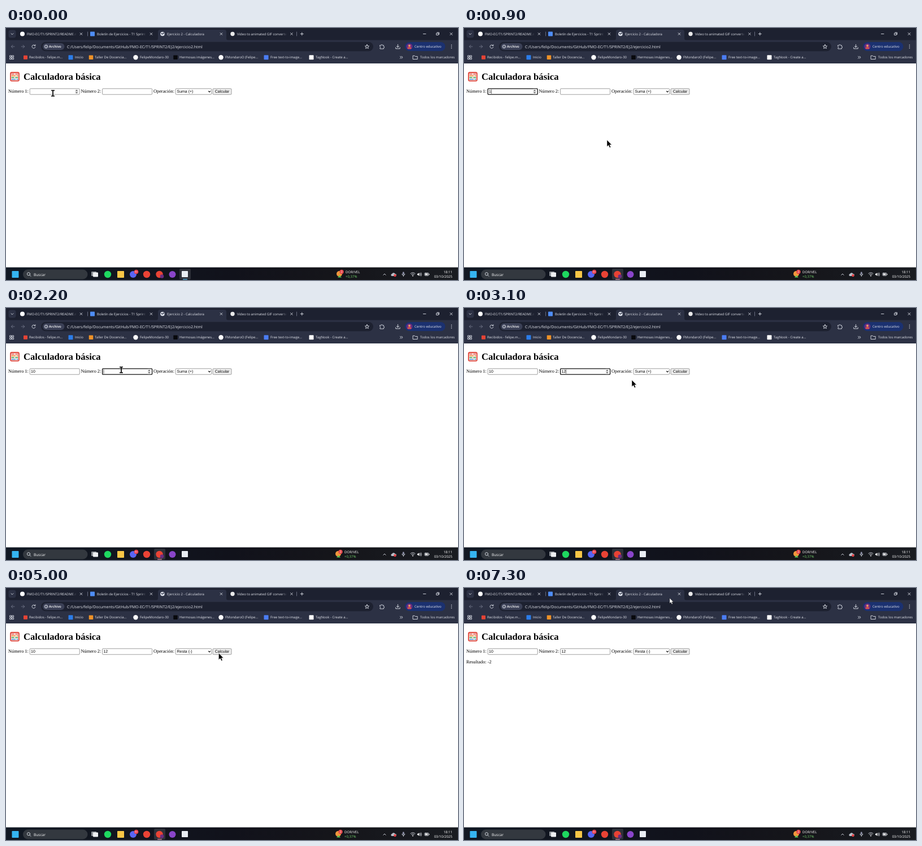
Write an HTML page that moves like this. It is 800x448 px and loops after 7.4 s.

```html
<!DOCTYPE html>
<html lang="es">
<head>
<meta charset="utf-8">
<title>Calculadora básica</title>
<style>
html, body { margin: 0; width: 100%; height: 100%; overflow: hidden; background: #fff; }
svg { display: block; width: 100vw; height: 100vh; }
text { font: 6px "Open Sans", "Noto Sans", sans-serif; fill: #e3e5ec; text-rendering: geometricPrecision; white-space: pre; }
.url { font-size: 6.95px; }
.bar { font-size: 6.1px; fill: #fff; }
.serif { font: 8.33px "Liberation Serif", serif; fill: #000; }
.title { font: bold 16.67px "Liberation Serif", serif; fill: #000; }
.ctl { font: 6.94px "Liberation Sans", sans-serif; fill: #000; }
.line { fill: none; stroke: #dfe2ea; stroke-width: .9; stroke-linecap: round; stroke-linejoin: round; }
.dim { stroke: #72778a; }
.box { fill: #fff; stroke: #767676; stroke-width: .7; }
.focus { stroke: #101010; stroke-width: 1.3; }
.end { text-anchor: end; }
.mid { text-anchor: middle; }
</style>
</head>
<body>
<svg viewBox="0 0 800 448" preserveAspectRatio="none">
  <defs>
    <linearGradient id="fade"><stop stop-color="#1d2130" stop-opacity="0"/><stop offset="1" stop-color="#1d2130"/></linearGradient>
    <linearGradient id="barFill"><stop stop-color="#111823"/><stop offset=".5" stop-color="#11121b"/><stop offset=".72" stop-color="#15151a"/><stop offset="1" stop-color="#191c21"/></linearGradient>
  </defs>
  <rect width="800" height="448" fill="#fff"/>
  <g id="browser"></g>
  <g id="page"></g>
  <g id="taskbar"></g>
  <g id="live"></g>
</svg>
<script>
const $ = id => document.getElementById(id);
const text = (x, y, s, cls = "", extra = "") => `<text x="${x}" y="${y}" class="${cls}" ${extra}>${s}</text>`;
const rect = (x, y, w, h, fill, r = 0) => `<rect x="${x}" y="${y}" width="${w}" height="${h}" rx="${r}" fill="${fill}"/>`;
const dot = (x, y, r, fill) => `<circle cx="${x}" cy="${y}" r="${r}" fill="${fill}"/>`;
const square = (x, y, s, fill) => rect(x - s / 2, y - s / 2, s, s, fill, .8);
const line = (d, cls = "") => `<path class="line ${cls}" d="${d}"/>`;
const ring = (x, y, r) => `<circle class="line" cx="${x}" cy="${y}" r="${r}"/>`;
const cross = (x, y, s) => line(`M${x - s} ${y - s}l${2 * s} ${2 * s}m0 ${-2 * s}l${-2 * s} ${2 * s}`);
const field = (x, y, w, h, cls = "") => `<rect class="box ${cls}" x="${x}" y="${y}" width="${w}" height="${h}" rx="1.2"/>`;

function drawBrowser() {
  const frame = "#1d2130", tool = "#2c3144";
  const tabText = (x, end, s) => text(x, 12.8, s) +
    rect(end - 10, 3, 10, 16, "url(#fade)") + rect(end, 3, 147 - 124, 16, frame);
  const marks = [
    [41, "Recibidos - felipe.m..."], [122, "Inicio"], [157, "Taller De Docencia..."],
    [237, "FelipeMondaro-30"], [307, "Hermosas imágenes..."], [388, "FMondaroO (Felipe..."],
    [468, "Free text-to-image..."], [548, "TagNook - Create a..."], [733, "Todos los marcadores"]
  ];
  let s = rect(0, 0, 800, 23, frame) + rect(0, 21.5, 800, 41.5, tool);

  // Tabs
  s += tabText(37, 125, "FMO-EC/T1/SPRINT2/README.md at") + tabText(161, 248, "Boletín de Ejercicios - T1 Sprint 2") +
    tabText(409, 497, "Video to animated GIF converter");
  s += `<path fill="${tool}" d="M265 22q4 0 4-4V7q0-4 4-4H386q4 0 4 4v11q0 4 4 4z"/>` + text(285, 12.8, "Ejercicio 2 - Calculadora");
  s += rect(4.5, 3.5, 13, 14, "#2c3144", 4) + line("M9 9.7l2 2 2-2");
  s += dot(29, 10.5, 4, "#fff") + square(153, 10.5, 8, "#4f8df5") + dot(401, 10.5, 3.7, "#e8e8e8");
  s += dot(277, 10.5, 3.8, "#dfe3ec") + `<path d="M274.5 9h2l1 1.5-1 2zM278 7.8l1.8 1-.4 2.2-1.5-.8z" fill="${tool}"/>`;
  for (const x of [133, 257, 381, 505.5]) s += cross(x, 10.5, 1.8);
  s += line("M144.5 7v7M514.5 7v7", "dim") + line("M521.3 10.5h5M523.8 8v5");
  s += line("M738.5 10.5h4.5M762 9.3h3.2v3.2h-3.2zM763 8h3.5v3.5") + cross(788, 10.5, 2);

  // Toolbar
  s += line("M15 33H9.5M12 30.3L9.3 33l2.7 2.7M27.3 33h5.5M30 30.3l2.7 2.7-2.7 2.7", "dim");
  s += line("M51.5 31.3a3 3 0 1 0 .4 2.7M51.9 29.6v2h-2");
  s += rect(62, 24.8, 588, 16.5, frame, 8.2) + rect(65, 27, 38.5, 12, "#3b4056", 6);
  s += ring(71, 33, 2.8) + line("M71 32.8v1.5M71 31.3v.1") + text(76, 35.2, "Archivo", "", 'style="fill:#fff;font-weight:600"');
  s += text(108, 35.5, "C:/Users/felip/Documents/GitHub/FMO-EC/T1/SPRINT2/EJ2/ejercicio2.html", "url");
  s += line("M639 29.5l1 2.4 2.6.2-2 1.7.7 2.6-2.3-1.4-2.3 1.4.7-2.6-2-1.7 2.6-.2z");
  s += line("M662 30.8h2a1.2 1.2 0 0 1 2.4 0h2v2a1.2 1.2 0 0 1 0 2.4v1.8H662v-2a1.2 1.2 0 0 0 0-2.2z");
  s += line("M693.5 29.3v5M691.3 32.2l2.2 2.2 2.2-2.2M689.8 34.6v2.2h7.4v-2.2");
  s += rect(706, 25, 71.5, 16, "#1b3170", 8) + dot(714, 33, 5.5, "#6b2d82") + dot(714, 31.6, 2, "#e59a62") +
    `<path d="M710.5 37a3.5 3.5 0 0 1 7 0z" fill="#d6534d"/>` + text(723, 35.2, "Centro educativo");
  for (const y of [30.2, 33, 35.8]) s += dot(788.5, y, .75, "#dfe2ea");

  // Bookmarks
  for (const [x, label] of marks) s += text(x, 54.3, label);
  for (const x of [7, 11]) for (const y of [49, 53]) s += `<rect class="line" x="${x}" y="${y}" width="2.6" height="2.6"/>`;
  s += square(34.5, 52.3, 7, "#e54335") + square(114.5, 52.3, 8, "#2b7de9") + square(150.5, 52.3, 7.5, "#ee9227");
  s += dot(229.5, 52.3, 4.2, "#fff") + square(300, 52.3, 7.5, "#08090d") + dot(380.5, 52.3, 4.2, "#fff");
  s += square(460.5, 52.3, 8, "#4b7df3") + square(540.5, 52.3, 8, "#fff");
  s += line("M697.6 50.2l1.7 2-1.7 2M700.2 50.2l1.7 2-1.7 2") + line("M720.5 49.3h2.7l1 1.2h4v5h-7.7z");
  $("browser").innerHTML = s;
}

function drawPage() {
  // Abacus
  let s = `<rect x="8" y="79" width="15" height="15.2" rx="2.4" fill="#fff4ec" stroke="#e1463c" stroke-width="1.8"/>`;
  ["#e5484d", "#f08a3c", "#3fae66", "#4a8fe0"].forEach((color, row) => {
    const y = 81.8 + row * 3.2;
    s += `<path d="M9 ${y}h13" stroke="#b98a79" stroke-width=".5"/>`;
    for (let i = 0; i < 4; i++) s += dot(10.9 + i * 2.4 + (i > 1 + row % 2 ? 2 : 0), y, 1.15, color);
  });
  s += text(31, 92.3, "Calculadora básica", "title");
  s += text(4, 115.4, "Número 1:", "serif") + text(132.5, 115.4, "Número 2:", "serif") + text(261, 115.4, "Operación:", "serif");
  s += `<rect class="box" x="366" y="107.8" width="33" height="10.4" rx="1.2" style="fill:#efefef"/>`;
  s += text(382.5, 115.4, "Calcular", "ctl mid");
  $("page").innerHTML = s;
}

function drawTaskbar() {
  let s = rect(0, 425.5, 800, 22.5, "url(#barFill)");
  s += square(16.5, 438, 12, "#35b5f2") + rect(30, 429.5, 114.5, 17, "#33383f", 8.5);
  s += ring(40, 437.3, 2.6) + line("M42 439.4l2 2") + text(49, 440.6, "Buscar", "bar", 'style="font-size:6.6px"');
  s += rect(151, 433, 9, 8, "#8d9197", 1) + rect(154, 434.5, 9, 8, "#eef0f2", 1);
  s += dot(180, 438, 6.2, "#1ed760") + square(203, 438, 12, "#f8c646") + dot(225, 438, 6, "#5865f2");
  s += dot(249, 438, 6.2, "#e94335") + dot(294.5, 438, 6, "#8a45c9");
  s += dot(230.5, 433.5, 3.8, "#e9404c") + text(230.5, 435.2, "9+", "mid", 'style="font-size:4.4px;fill:#fff"');
  s += line("M667.8 439.2l2.2-2.2 2.2 2.2");
  s += `<path d="M682.8 441a2 2 0 0 1 .4-3.9 3 3 0 0 1 5.5-.2 2 2 0 0 1 .4 4.1z" fill="#b9bec7"/>` + dot(688.5, 440, 2.2, "#e33e42");
  s += rect(702, 433.5, 2.8, 5, "#8e91a8", 1.4) + line("M700.9 437.2a2.5 2.5 0 0 0 5 0M703.4 439.8v1.8");
  s += line("M716 436.5q4-3.2 8 0M717.5 438.4q2.5-2 5 0") + dot(720, 440.5, 1, "#fff");
  s += `<path d="M728 436.7h1.5l2-1.8v6.2l-2-1.8H728z" fill="#fff"/>` + line("M733 436.2q1.2 1.8 0 3.6M734.5 435q2 3 0 6");
  s += `<rect class="line" x="741" y="435.6" width="7" height="4.6" rx="1"/>` + rect(742, 436.5, 4.5, 2.8, "#fff") + rect(748.4, 437, 1, 2, "#fff");
  s += text(790, 436.4, "18:11", "bar end") + text(790, 444.4, "03/10/2025", "bar end");
  $("taskbar").innerHTML = s;
}

// time, x, y of the pointer
const path = [
  [0, 83, 116], [400, 83, 115], [900, 253, 199], [1300, 251, 196], [1900, 204, 110], [2400, 204, 110],
  [3100, 297, 128], [3600, 337, 114], [3800, 337, 115], [4200, 328, 139], [4600, 328, 139],
  [5100, 382, 113], [5500, 382, 113], [6000, 391, 27], [6400, 385, 24], [7300, 364, 18]
];
const inputs = [42.2, 170.6];
const options = ["Suma (+)", "Resta (-)", "Multiplicación (×)", "División (÷)"];

function pointerAt(t) {
  const i = Math.max(1, path.findIndex(p => p[0] >= t));
  const [a, b] = [path[i - 1], path[i]];
  const u = (t - a[0]) / (b[0] - a[0]), k = u * u * (3 - 2 * u);
  return [a[1] + (b[1] - a[1]) * k, a[2] + (b[2] - a[2]) * k];
}

const typed = (t, first, second, value) => t < first ? "" : t < second ? value[0] : value;

function drawInput(x, value, focused, hovered, caret) {
  let s = field(x, 107.8, 88, 10.4, focused ? "focus" : "") + text(x + 1.9, 115.4, value, "ctl");
  if (focused && caret) s += rect(x + 2.1 + value.length * 3.86, 109.3, .6, 7.4, "#000");
  if (focused || hovered) {
    s += rect(x + 80, 108.6, 5.6, 8.8, "#ececec") +
      `<path d="M${x + 80.8} 112.2l2-2.6 2 2.6zM${x + 80.8} 114l2 2.6 2-2.6z" fill="#6a6a6a"/>`;
  }
  return s;
}

function drawMenu(y) {
  const active = y < 130.5 ? 0 : 1;
  let s = `<rect x="300.2" y="118.2" width="63.4" height="50" fill="#fff" stroke="#777" stroke-width=".7"/>`;
  options.forEach((label, i) => {
    const top = 118.2 + i * 12.4, on = i === active;
    if (on) s += rect(300.5, top, 62.8, 12.4, "#1e66c8");
    s += text(302.6, top + 8.4, label, "ctl", on ? 'style="fill:#fff"' : "");
  });
  return s;
}

function drawPointer(x, y, beam) {
  if (beam) return `<path d="M${x - 3} ${y - 5}h6M${x} ${y - 5}v10M${x - 3} ${y + 5}h6" fill="none" stroke="#000" stroke-width="1.7"/>`;
  const onDark = y < 63;
  return `<path transform="translate(${x} ${y}) scale(${onDark ? .78 : 1})" d="M0 0v12l2.8-2.6 2 4.4 2-.9-1.9-4.2h3.6z"
    fill="${onDark ? "#fff" : "#000"}" stroke="${onDark ? "#111" : "#fff"}" stroke-width=".5"/>`;
}

function drawTaskState(recording) {
  const x = recording ? 317 : 272, dx = recording ? 2 : 0;
  let s = rect(x - 10, 428, 20, 19, "#ffffff20", 2) + rect(x - 4, 446, 8, 1.3, recording ? "#58b7e8" : "#d98aa6", .6);
  s += dot(271.5, 438, 6.2, "#e94335") + dot(276, 441.5, 3.3, "#6b2d82") + square(316.5, 437.5, 11, "#e9edf3");
  s += dot(588 + dx, 437, 5, "#f0973c") + dot(592 + dx, 433.5, 3.7, "#e5484d") +
    text(592 + dx, 435.3, "2", "mid", 'style="font-size:5px;fill:#fff"');
  s += `<path d="M${585 + dx} 443.5l3.5-4 3.5 4z" fill="#5fc454"/>`;
  return s + text(599 + dx, 436.4, "DOR/VEL", "bar") + text(599 + dx, 444.4, "+0,37%", "bar", 'style="fill:#74d36c"');
}

function render(now) {
  const t = Math.floor(now % 7400 / 100) * 100;
  const [x, y] = pointerAt(t);
  const focus = t < 300 ? -1 : t < 2000 ? 0 : t < 3700 ? 1 : -1;
  const lastKey = [300, 900, 1100, 2000, 2600, 2800].filter(k => k <= t).pop() || 0;
  const caret = (t - lastKey) % 1000 < 500;
  const values = [typed(t, 900, 1100, "10"), typed(t, 2600, 2800, "12")];
  const inRow = y > 107.5 && y < 118.5;
  const hovered = inputs.findIndex(left => inRow && x > left && x < left + 88);

  let s = inputs.map((left, i) => drawInput(left, values[i], focus === i, hovered === i, caret)).join("");
  s += field(300.2, 107.8, 63.4, 10.4) + text(302.6, 115.4, options[t < 4600 ? 0 : 1], "ctl");
  s += `<path d="M358.1 111.9l1.9 2 1.9-2" fill="none" stroke="#111" stroke-width="1.1"/>`;
  if (t >= 3700 && t < 4600) s += drawMenu(y);
  if (t >= 5300) s += text(4, 134.4, "Resultado: -2", "serif");
  $("live").innerHTML = s + drawTaskState(t < 300) + drawPointer(x, y, hovered >= 0);
}

drawBrowser();
drawPage();
drawTaskbar();
const start = performance.now();
function tick() {
  render(performance.now() - start);
  requestAnimationFrame(tick);
}
tick();
</script>
</body>
</html>
```
